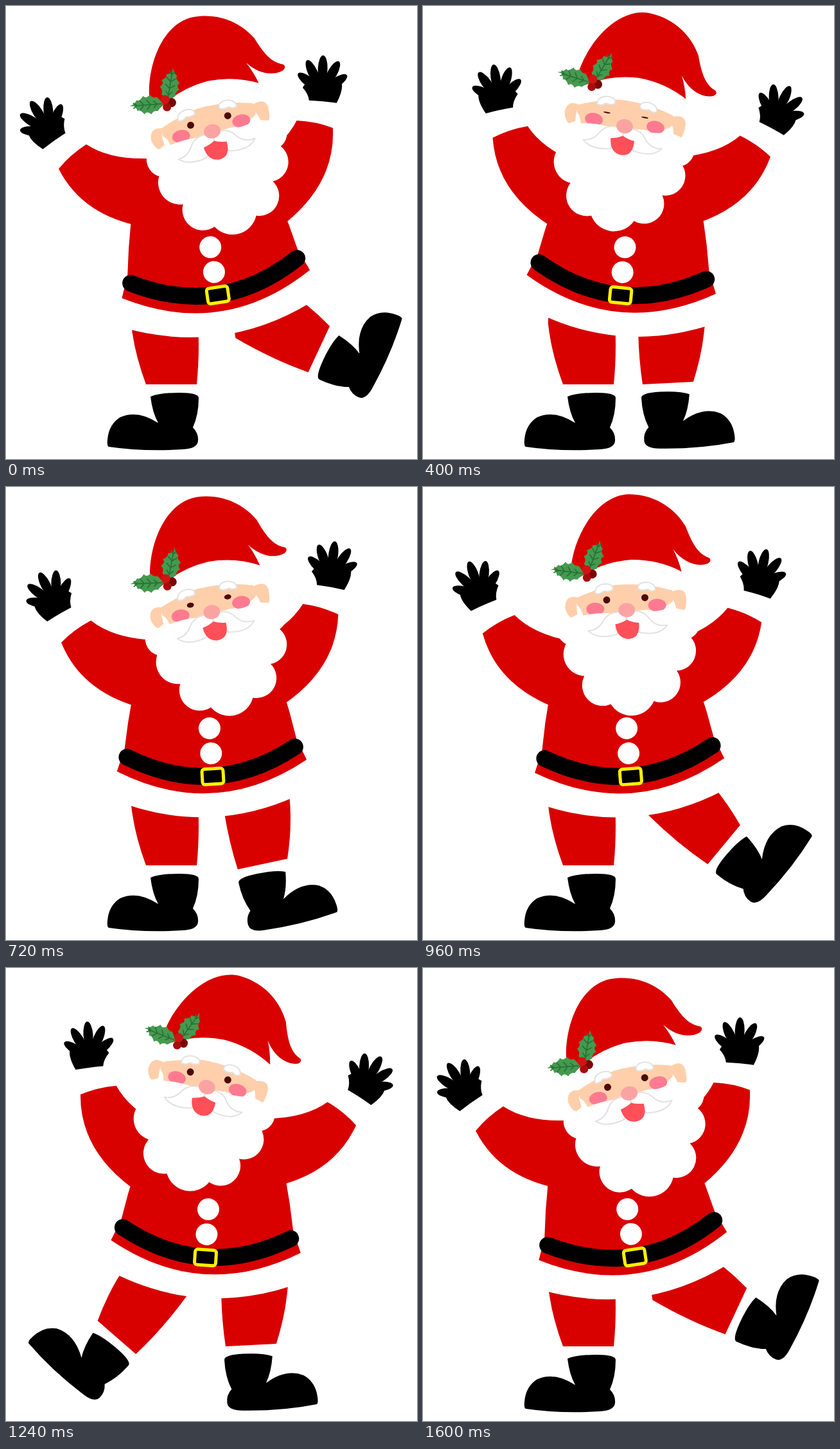
An HTML page for the animation above (2000 ms loop, 640x704 px).

```html
<!DOCTYPE html>
<html lang="en">
<head>
<meta charset="utf-8">
<title>Dancing Santa</title>
<style>
  html, body { margin: 0; width: 100%; height: 100%; overflow: hidden; background: #fff; }
  svg { display: block; width: 640px; height: 704px; }
  .red { fill: #d90000; }
  .white { fill: #fff; }
  .skin { fill: #ffcfab; }
  .hair { fill: #fff; stroke: #e2e2e2; stroke-width: 2; stroke-linejoin: round; }
  .cheek { fill: #ff7a90; }
  .eye { fill: #4d0808; }
</style>
</head>
<body>
<svg viewBox="0 0 640 704">
  <defs>
    <g id="leg">
      <path class="red" d="M218 588Q200 540 195 495Q193 470 215 450L270 445L297 463Q303 530 297 588Z"/>
      <path d="M225 607Q240 601 270 601Q300 601 300 609Q300 635 291 655Q300 664 299 676Q298 688 275 689Q215 693 160 685Q157 684 158 674Q160 650 178 639Q205 627 237 648Q228 632 225 607Z"/>
    </g>
    <g id="arm" transform="translate(-213.4 -293.8)">
      <path class="red" d="M82 253Q100 231 125 215Q160 238 217 237L265 240V335L219 344Q120 328 82 253Z"/>
      <g transform="rotate(-30 213.4 293.8)">
        <path d="M114 154Q104 135 106 124Q118 110 136 110Q156 112 167 130Q158 140 157 150Q134 151 114 154Z"/>
        <g id="fingers" transform="translate(137 137)"/>
      </g>
    </g>
    <g id="leaf" fill="#449a4f" stroke="#2a6f37" stroke-width="1.7"/>
  </defs>

  <g id="legL"><use href="#leg"/></g>
  <g id="legR"><use href="#leg" transform="translate(342 588.5) rotate(-2.9) scale(-1 1) translate(-297 -588.5)"/></g>
  <g id="armL"><use href="#arm"/></g>
  <g id="armR"><use href="#arm"/></g>

  <g id="body">
    <path class="white" d="M-147 70L-160 115Q0 191 160 115L147 70Z"/>
    <path class="red" d="M-90-100L-117-40L-126-2L-134 39L-148 73Q0 159 148 73L134 39L126-2L117-40L90-100Z"/>
    <path d="M-131 52Q0 127 131 52" fill="none" stroke="#000" stroke-width="26" stroke-linecap="round"/>
    <rect x="-16" y="78" width="33" height="24" rx="4" stroke="#fff000" stroke-width="5"/>
    <circle class="white" cy="15" r="17"/>
    <circle class="white" cy="54" r="17"/>
  </g>

  <g id="head">
    <circle class="white" cx="234.5" cy="219" r="27"/>
    <circle class="white" cx="405" cy="212" r="26"/>
    <path class="white" d="M236 120L228 195L222 243A34 34 0 0 0 250 293A32 32 0 0 0 291 337A38 38 0 0 0 358 333A31 31 0 0 0 394 286A31 31 0 0 0 417 235L408 190L402 125Z"/>
    <path class="red" d="M230 132C234 75 273 11 323 11C366 12 396 37 410 62C419 86 428 105 446 111Q451 115 444 120C426 126 405 117 390 97Q398 112 403 132Q367 113 325 113Q280 116 245 139Z"/>
    <path class="skin" d="M240 171Q270 158 300 152Q345 148 388 161L389 178Q372 193 345 191L290 197L249 199Q247 188 240 183Z"/>
    <path class="skin" d="M242 171Q222 165 221 186Q224 200 231 202L240 197L239 183Z"/>
    <path class="skin" d="M387 163Q408 155 410 172Q410 188 407 192L394 189Q392 178 388 175Z"/>
    <ellipse class="cheek" cx="268" cy="189" rx="14" ry="10"/>
    <ellipse class="cheek" cx="364.5" cy="184" rx="14" ry="10"/>
    <path class="white" d="M245 200Q268 194 292 196L300 215H250ZM342 192Q365 196 388 187L385 205H345Z"/>
    <ellipse class="eye" cx="286" cy="175" rx="5.5"/>
    <ellipse class="eye" cx="345.5" cy="172" rx="5.5"/>
    <path class="hair" d="M268 164Q268 151 285 150Q297 151 296 159Q290 163 282 161Q274 168 268 164Z"/>
    <path class="hair" d="M335 158Q334 148 349 148Q362 150 362 160Q356 164 350 159Q340 162 335 158Z"/>
    <path class="hair" d="M317 195Q290 190 280 208Q272 222 257 223Q272 237 301 229L317 206Z"/>
    <path class="hair" d="M317 195Q342 188 353 206Q364 218 380 215Q368 232 337 226L317 206Z"/>
    <path fill="#ff4f58" d="M299 213Q309 211 317 206Q325 210 336 211Q338 236 318 236Q301 234 299 213Z"/>
    <ellipse fill="#fba3a3" cx="317" cy="191" rx="13" ry="11"/>
    <use href="#leaf" transform="translate(251 133.5) rotate(187)"/>
    <use href="#leaf" transform="translate(258 131) rotate(-69)"/>
    <circle fill="#7a0606" cx="264" cy="134.5" r="7"/>
    <circle fill="#a80c0c" cx="255.5" cy="140" r="6.5"/>
    <circle fill="#d01414" cx="255" cy="128" r="7"/>
  </g>
</svg>
<script>
const LOOP = 2000, DANCE = 1600, STEP = 40;
const $ = id => document.getElementById(id);

function add(parent, tag, attrs) {
  const el = document.createElementNS('http://www.w3.org/2000/svg', tag);
  for (const name in attrs) el.setAttribute(name, attrs[name]);
  parent.append(el);
}

// Five fingers fanned around the palm, the middle one longest.
for (let i = -2; i <= 2; i++) {
  add($('fingers'), 'ellipse', {
    cy: 2.5 * i * i - 36, rx: 7.5, ry: 21, transform: `rotate(${27 * i - 2})`
  });
}

// Holly leaf along the x axis: four spikes on each side, then the veins.
let veins = 'M2 0H46';
for (const side of [-1, 1]) {
  let edge = 'M0 0';
  for (let k = 1; k <= 4; k++) {
    const x = 10.5 * k - 1, y = side * 15.5 * Math.sin(Math.PI * (k + .3) / 5.3);
    edge += `Q${x - 4} ${y * .6} ${x} ${y}`;
    veins += `M${x} 0l6 ${y * .5}`;
  }
  add($('leaf'), 'path', { d: edge + 'Q44 3 52 0Z', stroke: 'none' });
}
add($('leaf'), 'path', { d: veins, fill: 'none' });

// Times at which the sway turns round; even turns lean right, odd ones left.
const upper = [0, 520, 760, 1280, DANCE];
const torso = [0, 480, 820, 1400, DANCE];
const linear = x => x;
const smooth = x => (1 - Math.cos(Math.PI * x)) / 2;

function sway(turns, t, fall = linear) {
  const i = Math.min(turns.findLastIndex(turn => turn <= t), turns.length - 2);
  const x = (t - turns[i]) / (turns[i + 1] - turns[i]);
  return i % 2 ? 1 - fall(x) : x;
}

const kick = (t, width, ...peaks) =>
  62 * Math.max(0, ...peaks.map(peak => 1 - Math.abs(t - peak) / width));

const pose = (id, transform) => $(id).setAttribute('transform', transform);
const eyes = document.querySelectorAll('.eye');

function draw(ms) {
  const t = Math.min(DANCE, Math.floor(ms % LOOP / STEP) * STEP);
  const raise = 30 * sway(upper, t);
  const open = Math.min(1, Math.max(.2, Math.abs(t - 420) / 430));
  pose('legL', `rotate(${kick(t, 160, 560, 1294)} 233.5 467.5)`);
  pose('legR', `rotate(${-kick(t, 220, 0, 908, DANCE)} 390.6 471.5)`);
  pose('armL', `translate(213.4 293.8) rotate(${raise})`);
  pose('armR', `translate(415.5 290.5) scale(-1 1) rotate(${30 - raise})`);
  pose('body', `translate(316 360) rotate(${17 * sway(torso, t) - 8.5})`);
  pose('head', `rotate(${28.5 * sway(upper, t, smooth) - 11.5} 338 172.5)`);
  eyes.forEach(eye => eye.setAttribute('ry', 5.5 * open));
}

const start = performance.now();
function tick() {
  draw(performance.now() - start);
  requestAnimationFrame(tick);
}
tick();
</script>
</body>
</html>
```
